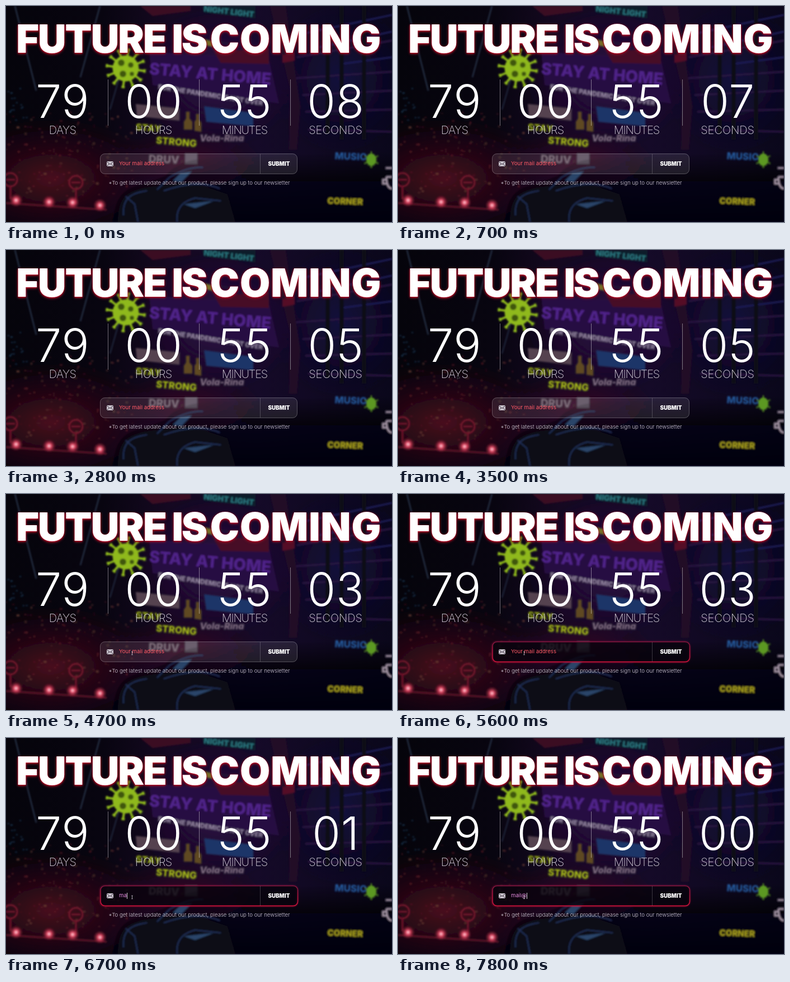
An HTML page for the animation above (8 s loop, 690 by 388 pixels).

```html
<!DOCTYPE html>
<html lang="en">
<head>
<meta charset="utf-8">
<title>Countdown</title>
<style>
html, body { margin: 0; width: 100%; height: 100%; overflow: hidden; background: #08050f; }
svg { display: block; width: 690px; height: 388px; font-family: Inter, "Open Sans", sans-serif; }
text { white-space: pre; }
.title { font-size: 70px; font-weight: 900; fill: #fff; text-anchor: middle;
  filter: drop-shadow(0 1px 1px #c00a24) drop-shadow(0 1px 2px #900a20); }
.num { font-size: 82px; font-weight: 350; letter-spacing: 1px; fill: #fff; text-anchor: middle; }
.label { font-size: 20px; font-weight: 200; fill: #d9d5de; text-anchor: middle; }
.sign { font-weight: 800; text-anchor: middle; }
</style>
</head>
<body>
<svg viewBox="0 0 690 388">
  <defs>
    <linearGradient id="base">
      <stop offset="0" stop-color="#05040b"/><stop offset=".25" stop-color="#080510"/>
      <stop offset=".42" stop-color="#150821"/><stop offset=".65" stop-color="#150a28"/>
      <stop offset="1" stop-color="#0a071b"/>
    </linearGradient>
    <linearGradient id="shade" x2="0" y2="1">
      <stop offset="0" stop-color="#060309" stop-opacity="0"/>
      <stop offset=".45" stop-color="#060309" stop-opacity=".75"/>
      <stop offset="1" stop-color="#060309"/>
    </linearGradient>
    <linearGradient id="edge" x2="0" y2="1">
      <stop offset="0" stop-color="#85163f"/><stop offset="1" stop-color="#d3123c"/>
    </linearGradient>
    <radialGradient id="red"><stop offset="0" stop-color="#5e1022" stop-opacity=".75"/><stop offset="1" stop-color="#3a0a18" stop-opacity="0"/></radialGradient>
    <radialGradient id="violet"><stop offset="0" stop-color="#42145e" stop-opacity=".7"/><stop offset="1" stop-color="#240c3a" stop-opacity="0"/></radialGradient>
    <radialGradient id="navy"><stop offset="0" stop-color="#1a1650" stop-opacity=".6"/><stop offset="1" stop-color="#100c30" stop-opacity="0"/></radialGradient>
    <radialGradient id="lamp"><stop offset="0" stop-color="#ffe0e8"/><stop offset=".3" stop-color="#e8506c"/><stop offset="1" stop-color="#90102a" stop-opacity="0"/></radialGradient>
    <filter id="soft" x="-5%" y="-5%" width="110%" height="110%"><feGaussianBlur stdDeviation="1.6"/></filter>
    <filter id="glow" x="-10%" y="-60%" width="120%" height="220%"><feGaussianBlur stdDeviation="1.8"/></filter>
  </defs>

  <rect width="690" height="388" fill="url(#base)"/>
  <g id="city" filter="url(#soft)">
    <ellipse cx="375" cy="130" rx="150" ry="130" fill="url(#violet)"/>
    <ellipse cx="600" cy="130" rx="130" ry="140" fill="url(#navy)"/>
    <ellipse cx="80" cy="310" rx="200" ry="110" fill="url(#red)"/>
    <ellipse cx="325" cy="280" rx="140" ry="60" fill="url(#red)" opacity=".6"/>
    <g stroke="#33455f" fill="none" stroke-width="2">
      <path d="M16 0 54 152" opacity=".8"/><path d="M168 0 133 128" opacity=".8"/><path d="M202 130 186 186" opacity=".6"/>
    </g>
    <!-- right-hand buildings -->
    <g fill="none" stroke="#2a1642" stroke-width="3">
      <path d="M520 92 690 62M515 130 690 118M530 160 690 152M535 190 690 186M540 222 690 226"/>
      <path d="M530 50 690 16M560 74 690 46M600 104 690 92" stroke="#1f1c58"/>
      <path d="M600 0V240M640 0V240M575 30V230" stroke="#100918" stroke-width="8"/>
    </g>
    <path d="M472 0 500 0 526 180 520 258 506 258 508 150Z" fill="#220a26"/>
    <path d="M494 88 516 84V98L494 102Z" fill="#551028"/>
    <!-- panels -->
    <path d="M240 0H330V9L262 18Z" fill="#3b0b22"/>
    <path d="M350 0H446V22L354 12Z" fill="#0c1a2a"/>
    <path d="M256 82 470 97 488 175 262 142Z" fill="#260e42"/>
    <path d="M372 82 470 76V104L384 102Z" fill="#470d26"/>
    <path d="M344 58 372 64 374 74 346 68Z" fill="#747328"/>
    <path d="M354 180 442 192V216L358 208Z" fill="#1c3468"/>
    <path d="M232 176 310 184V206L234 198Z" fill="#55434f"/>
    <path d="M318 222V208L322 202V190H328V202L333 208V222ZM337 224V208L340 204V194H345V204L349 210V226Z" fill="#5e4a24"/>
    <rect x="320" y="265" width="22" height="19" fill="#5c4f5f"/>
    <!-- virus -->
    <g fill="#8fb91b" stroke="#8fb91b">
      <circle cx="214" cy="112" r="23"/><g id="spikes"></g>
      <g fill="#3f5710" stroke="none"><circle cx="206" cy="102" r="6"/><circle cx="223" cy="106" r="5"/><circle cx="209" cy="122" r="6"/><circle cx="225" cy="122" r="4"/></g>
    </g>
    <!-- street lights -->
    <g id="dots"></g>
    <g fill="none" stroke="#73162b" stroke-width="3"><circle cx="125" cy="317" r="12"/><circle cx="8" cy="312" r="12"/><path d="M117 317H133M0 312H16M125 329V355M8 324V347"/></g>
    <path d="M0 354 180 366" stroke="#5d1428" stroke-width="3"/>
    <!-- car -->
    <path d="M190 388C196 336 214 326 246 320L286 304C300 282 345 268 405 272L690 262V388Z" fill="url(#shade)"/>
    <path d="M200 388C200 350 210 334 248 326L330 316 396 338 410 388Z" fill="#090917"/>
    <g fill="none" stroke="#22305a" stroke-width="2"><path d="M210 376C208 348 220 336 252 332M270 330 292 308Q326 288 352 290M282 332Q342 310 382 328M306 388Q302 354 338 345L384 350M214 342 230 356 236 388"/></g>
    <path d="M298 314 312 300 332 297 314 316ZM318 356 372 350 338 363Z" fill="#294469"/>
    <g id="lamps"></g>
    <!-- right-hand icons -->
    <g fill="#5c9821" stroke="#5c9821" stroke-width="2"><ellipse cx="653" cy="276" rx="8" ry="10"/><path d="M641 269 665 283M641 283 665 269M653 261V290"/></g>
    <path d="M679 291H690M680 307H690M680 307Q680 327 690 328M680 312H674V319H682" fill="none" stroke="#a798a7" stroke-width="3"/>
  </g>

  <text class="title" x="152" y="83.5" letter-spacing="-2">FUTURE</text>
  <text class="title" x="327" y="83.5" letter-spacing="-3">IS</text>
  <text class="title" x="518" y="83.5" letter-spacing="1">COMING</text>

  <path d="M182.5 132V215M345.5 132V215M508.5 132V215" stroke="#fff" stroke-opacity=".42"/>
  <g id="units"></g>

  <rect id="field" x="168.5" y="265.5" width="352" height="36" rx="8" fill="#fff" fill-opacity=".09" stroke="#fff" stroke-opacity=".27"/>
  <g id="focus">
    <rect x="168.5" y="265.5" width="352.5" height="36" rx="8" fill="none" stroke="url(#edge)" stroke-width="3" opacity=".5" filter="url(#glow)"/>
    <rect x="169" y="265.5" width="352.5" height="36" rx="8" fill="#07030c" fill-opacity=".76" stroke="url(#edge)" stroke-width="1.5"/>
  </g>
  <path d="M454.5 266V301" stroke="#fff" stroke-opacity=".2"/>
  <g fill="#c9c3cc"><rect x="180" y="279" width="12" height="9" rx="1"/><path d="M180 279.5 186 284.5 192 279.5M180 288 184.5 283.5M192 288 187.5 283.5" fill="none" stroke="#35293a"/></g>
  <text id="entry" x="202" y="286" font-size="9.6"></text>
  <path id="caret" d="M.5 278V289" stroke="#d8d0dc"/>
  <text x="488" y="287" font-size="9.8" font-weight="900" fill="#fff" text-anchor="middle">SUBMIT</text>
  <text x="345.5" y="320.5" font-size="9.6" font-weight="300" fill="#d2ccd6" text-anchor="middle">*To get latest update about our product, please sign up to our newsletter</text>
  <g id="pointer">
    <path id="arrow" d="M0 0V7L1.8 5.4 4.8 5Z" fill="#0a0a0c" stroke="#77727c" stroke-width=".5"/>
    <path id="beam" d="M-1.3-2.8H1.3M0-2.8V2.8M-1.3 2.8H1.3" fill="none" stroke="#c8c2cc" stroke-width=".8"/>
  </g>
</svg>
<script>
const $ = id => document.getElementById(id);
const add = (id, html) => $(id).insertAdjacentHTML('beforeend', html);
let seed = 11;
const rnd = () => (seed = seed * 16807 % 2147483647) / 2147483647;

const sign = (text, x, y, size, fill, turn, style = '') => add('city',
  `<text class="sign" transform="translate(${x} ${y}) rotate(${turn})" font-size="${size}" fill="${fill}" style="${style}">${text}</text>`);
sign('NIGHT LIGHT', 398, 15, 14, '#2a7880', 7);
sign('STAY AT HOME', 364, 132, 29, '#502389', 5);
sign('FOR THE PANDEMIC IS NOT OVER', 365, 164, 11.5, '#9a8ea6', 9);
sign('STAY', 254, 225, 17, '#96aa18', 5);
sign('STRONG', 304, 250, 17, '#a8bd18', 5);
sign('Vola-Rina', 386, 243, 16, '#847285', 0, 'font-style:italic');
sign('DRUV', 282, 282, 19, '#75636f', 2);
sign('MUSIC', 616, 276, 17, '#24589a', 2);
sign('CORNER', 606, 356, 15, '#a8a01c', 2);

for (let i = 0; i < 12; i++) add('spikes',
  `<path transform="translate(214 112) rotate(${i * 30 + 8})" d="M22 0H34M34-3V3" stroke-width="4"/>`);
for (let i = 0; i < 150; i++) {
  const x = rnd() * 225, y = 190 + rnd() * 150;
  add('dots', `<rect x="${x}" y="${y}" width="${1 + rnd() * 4}" height="${1 + rnd() * 3}" fill="${rnd() < .75 ? '#701b29' : '#794638'}" opacity="${.3 + rnd() * .55}"/>`);
}
for (let i = 0; i < 18; i++) add('dots',
  `<rect x="${rnd() * 45}" y="${145 + rnd() * 60}" width="3" height="2" fill="#1d4568" opacity=".7"/>`);
for (const [x, y] of [[18, 349], [77, 352], [119, 353], [168, 358]])
  add('lamps', `<circle cx="${x}" cy="${y}" r="12" fill="url(#lamp)"/>`);

[['DAYS', '79', -.6], ['HOURS', '00', -.7], ['MINUTES', '55', -1.2], ['SECONDS', '08', 0]].forEach(([name, value, gap], i) => {
  const x = 101 + i * 162.7;
  add('units', `<text class="num" id="${name}" x="${x + .5}" y="201">${value}</text>
    <text class="label" x="${x}" y="230" letter-spacing="${gap}">${name}</text>`);
});

const LOOP = 8000, FOCUS = 4730, BLINK = 530;
const ticks = [600, 1600, 2600, 3600, 4600, 5700, 6700, 7700];
const keys = [[6100, 'm'], [6400, 'ma'], [6800, 'mai'], [7000, 'mail'], [7700, 'mail@']];
const clamp = v => Math.max(0, Math.min(1, v));
const mix = (a, b, k) => a + (b - a) * k;

function draw(t) {
  $('SECONDS').textContent = '0' + (8 - ticks.filter(s => t >= s).length);

  const k = clamp((t - FOCUS) / 270);
  $('focus').setAttribute('opacity', k);
  $('field').setAttribute('opacity', 1 - k);

  const [since, typed] = keys.filter(e => t >= e[0]).pop() || [FOCUS, ''];
  const entry = $('entry');
  entry.textContent = typed || 'Your mail address';
  entry.setAttribute('fill', typed ? '#e28bdc' : '#ff5a66');
  const end = 202 + (typed ? entry.getComputedTextLength() : 0);
  $('caret').setAttribute('transform', `translate(${Math.round(end)} 0)`);
  $('caret').setAttribute('opacity', t >= FOCUS && (t - since) % (2 * BLINK) < BLINK ? 1 : 0);

  // arrow outside the field, text beam inside it
  const m = clamp((t - 3500) / 800), ease = m * m * (3 - 2 * m);
  const x = mix(106, 225.5, ease), y = mix(225, 286, ease);
  const inside = x > 168 && y > 265;
  $('pointer').setAttribute('transform', `translate(${x} ${y})`);
  $('arrow').setAttribute('opacity', m > 0 && !inside ? 1 : 0);
  $('beam').setAttribute('opacity', inside ? 1 : 0);
}

function frame() {
  draw(performance.now() % LOOP);
  requestAnimationFrame(frame);
}
frame();
</script>
</body>
</html>
```
